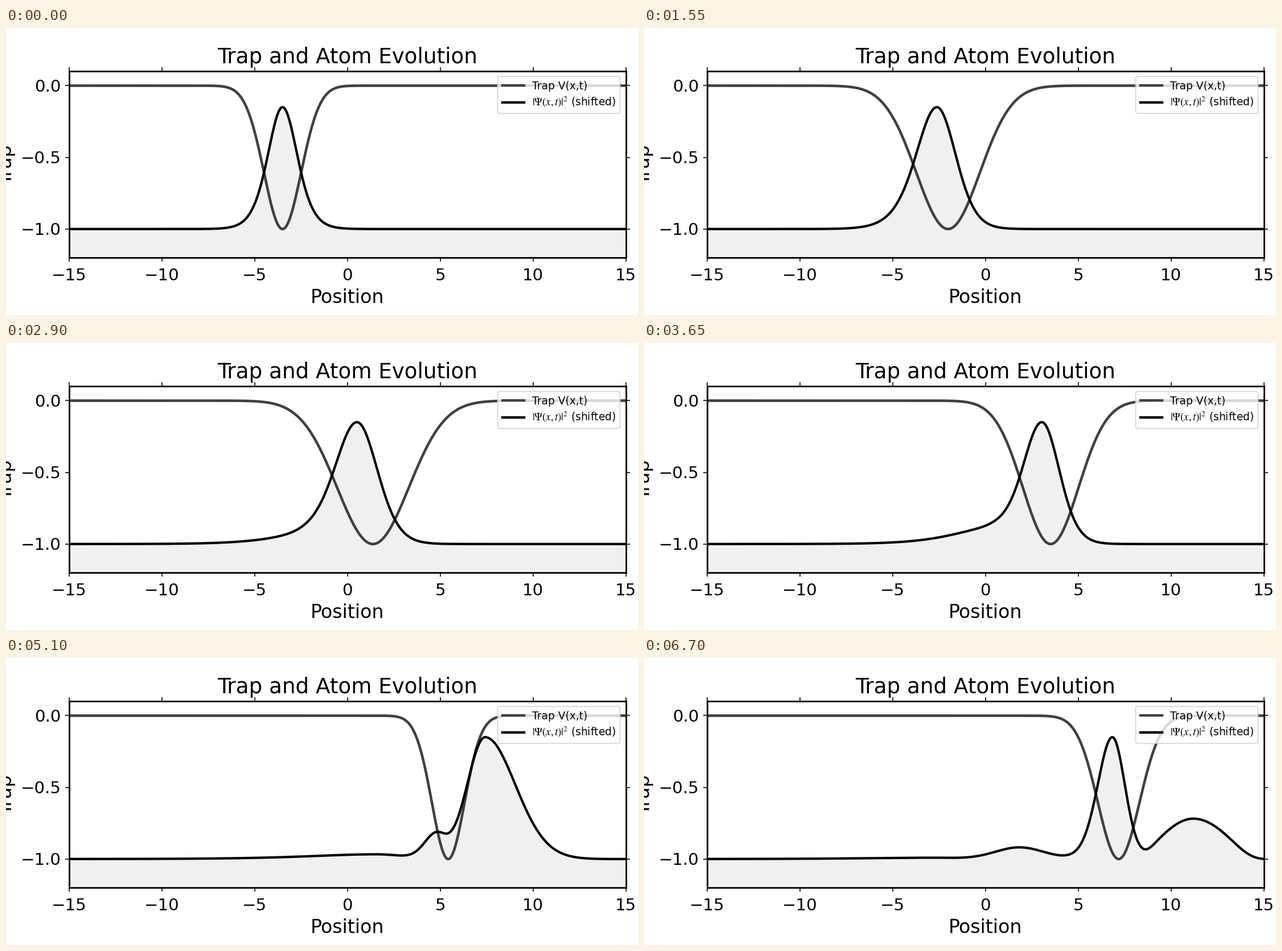
Write a matplotlib script that moves like this. It is 1110 px wide and 505 px high and loops after 6750 ms.

```python
import numpy as np
import matplotlib.pyplot as plt
from matplotlib.animation import FuncAnimation
from matplotlib.patches import FancyBboxPatch

W, H, DPI = 1110, 505, 128
FRAMES, INTERVAL = 135, 50
PX = 72 / DPI  # points per pixel
LEFT, RIGHT, TOP, BOTTOM = 111, 1088.5, 76.2, 404.2
GREY, FILL = "#404040", "#f0f0f0"
PEAK = 0.85
PULL, RELEASE, ESCAPE = 44, 73, 102  # stages of the motion, in frames

plt.rcParams["font.family"] = "DejaVu Sans"
plt.rcParams["mathtext.fontset"] = "stix"

KEYS = np.array([0, 18, PULL, RELEASE, ESCAPE, 119, 134])
x = np.linspace(-15, 15, 1200)


def track(*values):
    """Smooth curve through the key points, starting from rest."""
    v = np.array(values, float)
    m = np.gradient(v, KEYS)
    m[0] = 0

    def at(n):
        i = min(np.searchsorted(KEYS, n, side="right") - 1, len(KEYS) - 2)
        h = KEYS[i + 1] - KEYS[i]
        s = (n - KEYS[i]) / h
        return (v[i] * (1 + 2 * s) * (1 - s) ** 2 + v[i + 1] * s * s * (3 - 2 * s)
                + h * s * (1 - s) * (m[i] * (1 - s) - m[i + 1] * s))
    return at


trap_center = track(-3.5, -2.96, -0.675, 3.515, 5.43, 6.47, 7.18)
trap_width = track(1, 1.22, 2.12, 1.5, 0.88, 1.02, 1.12)
atom_center = track(-3.5, -3.24, -1.52, 3.055, 7.42, 10.33, 11.2)


def ramp(n, start, end):
    return min(max((n - start) / (end - start), 0), 1)


def ease(n, start, end):
    s = ramp(n, start, end)
    return s * s * (3 - 2 * s)


def mix(a, b, s):
    return a + (b - a) * s


def lump(center, height, wl, wr, pl=20, pr=20):
    """Two-sided sech**p bump; a large p tends to a Gaussian."""
    d = x - center
    width, p = np.where(d < 0, wl, wr), np.where(d < 0, pl, pr)
    return height * np.cosh(d / (width * np.sqrt(p))) ** -p


def potential(n):
    return -np.exp(-0.5 * ((x - trap_center(n)) / trap_width(n)) ** 2)


def packet(n):
    """Bound state that lags behind the trap, then leaves it and spreads."""
    lag = ease(n, 0, 18)
    free = ease(n, RELEASE, ESCAPE)
    late = 1 - (1 - ramp(n, ESCAPE, 122)) ** 2
    bound = 0.77 * trap_width(n) ** 0.65
    center = atom_center(n)
    shape = lump(center, np.exp(-max(n - ESCAPE, 0) / 29),
                 mix(bound, 0.97, free) + 0.72 * late,
                 mix(bound * (1 - 0.085 * lag), 1.63, free) + 0.25 * late,
                 2.7 - 0.4 * lag + 1.7 * ease(n, PULL, RELEASE) + 16 * free,
                 2.7 + 2.5 * lag + 15 * free)
    edge = center - 9 + 5 * free + 1.53 * late
    return shape / (1 + np.exp(-(x - edge) / 0.3))


def recaptured(n):
    """Part of the atom that stays in the trap and takes over."""
    width = trap_width(n)
    center = trap_center(n) - 0.7 + 0.36 * ramp(n, ESCAPE, 134)
    return lump(center, ramp(n, RELEASE, 119) ** 3.6, 0.7 * width, 0.6 * width, 7)


def tail(n):
    """Faint trail left behind by the acceleration."""
    height = 0.124 * ease(n, PULL, RELEASE) * np.exp(-max(n - RELEASE, 0) / 25)
    return lump(1.76 - 0.0031 * (n - 95) ** 2, height,
                2 + 1.4 * ease(n, RELEASE, ESCAPE), 1.3, 1.5, 4)


def ripple(n):
    age = max(n - ESCAPE, 0)
    width = 0.45 + 0.027 * age
    return lump(1.83, 0.003 * age, width, width)


def density(n):
    wall = 1 - np.exp(-((15.2 - x) / 1.4) ** 2)
    total = wall * (packet(n) + recaptured(n) + tail(n) + ripple(n))
    return PEAK * total / total.max()


fig = plt.figure(figsize=(W / DPI, H / DPI), dpi=DPI, facecolor="white")
ax = fig.add_axes([LEFT / W, 1 - BOTTOM / H, (RIGHT - LEFT) / W, (BOTTOM - TOP) / H])
ax.set(xlim=(-15, 15), ylim=(-1.2, 0.1),
       xticks=range(-15, 16, 5), yticks=[-1, -0.5, 0])
ax.tick_params(direction="out", length=6.8 * PX, width=1.6 * PX, top=True, right=True,
               labelbottom=False, labelleft=False)
for spine in ax.spines.values():
    spine.set_linewidth(2.8 * PX)

area, = ax.fill([0, 0], [0, 0], color=FILL, lw=0, zorder=1)
trap_line, = ax.plot([], [], color=GREY, lw=4.6 * PX, zorder=2)
atom_line, = ax.plot([], [], color="black", lw=4.2 * PX, zorder=2.1)

# Overlay in pixel coordinates for labels and legend
page = fig.add_axes([0, 0, 1, 1])
page.set(xlim=(0, W), ylim=(H, 0))
page.axis("off")


def label(px, py, text, size, ha="center", **kw):
    page.text(px, py, text.replace("-", "\u2212"), fontsize=size * PX,
              ha=ha, va="baseline", **kw)


mid = (LEFT + RIGHT) / 2
label(mid - 0.5, 62, "Trap and Atom Evolution", 37.3)
label(mid, 483.5, "Position", 33.3)
label(10, (TOP + BOTTOM) / 2, "Trap", 33.3, rotation=90, rotation_mode="anchor")
for value in range(-15, 16, 5):
    label(mid + value * (RIGHT - LEFT) / 30, 443.5, f"{value}", 29.2)
for value in (0, -0.5, -1):
    py = TOP + (0.1 - value) * (BOTTOM - TOP) / 1.3
    label(97, py + 10.6, f"{value:.1f}", 29.2, ha="right")

page.add_patch(FancyBboxPatch((863.5, 85.3), 215, 65, boxstyle="round,pad=0,rounding_size=3.7",
                              fc="white", ec="0.8", alpha=0.8, lw=1.85 * PX))
for py, color, text in ((101.3, GREY, "Trap V(x,t)"),
                        (130.6, "black", r"$|\Psi(x,t)|^2$ (shifted)")):
    page.plot([872, 910], [py, py], color=color, lw=4.4 * PX, solid_capstyle="projecting")
    label(924.5, py + 6.3, text, 18.6, ha="left")


def draw(n):
    atom = density(n) - 1
    trap_line.set_data(x, potential(n))
    atom_line.set_data(x, atom)
    area.set_xy(np.column_stack([np.r_[-15, x, 15], np.r_[-1.2, atom, -1.2]]))
    return area, trap_line, atom_line


anim = FuncAnimation(fig, draw, frames=FRAMES, init_func=lambda: draw(0),
                     interval=INTERVAL, repeat=True, repeat_delay=0)
plt.show()
```
